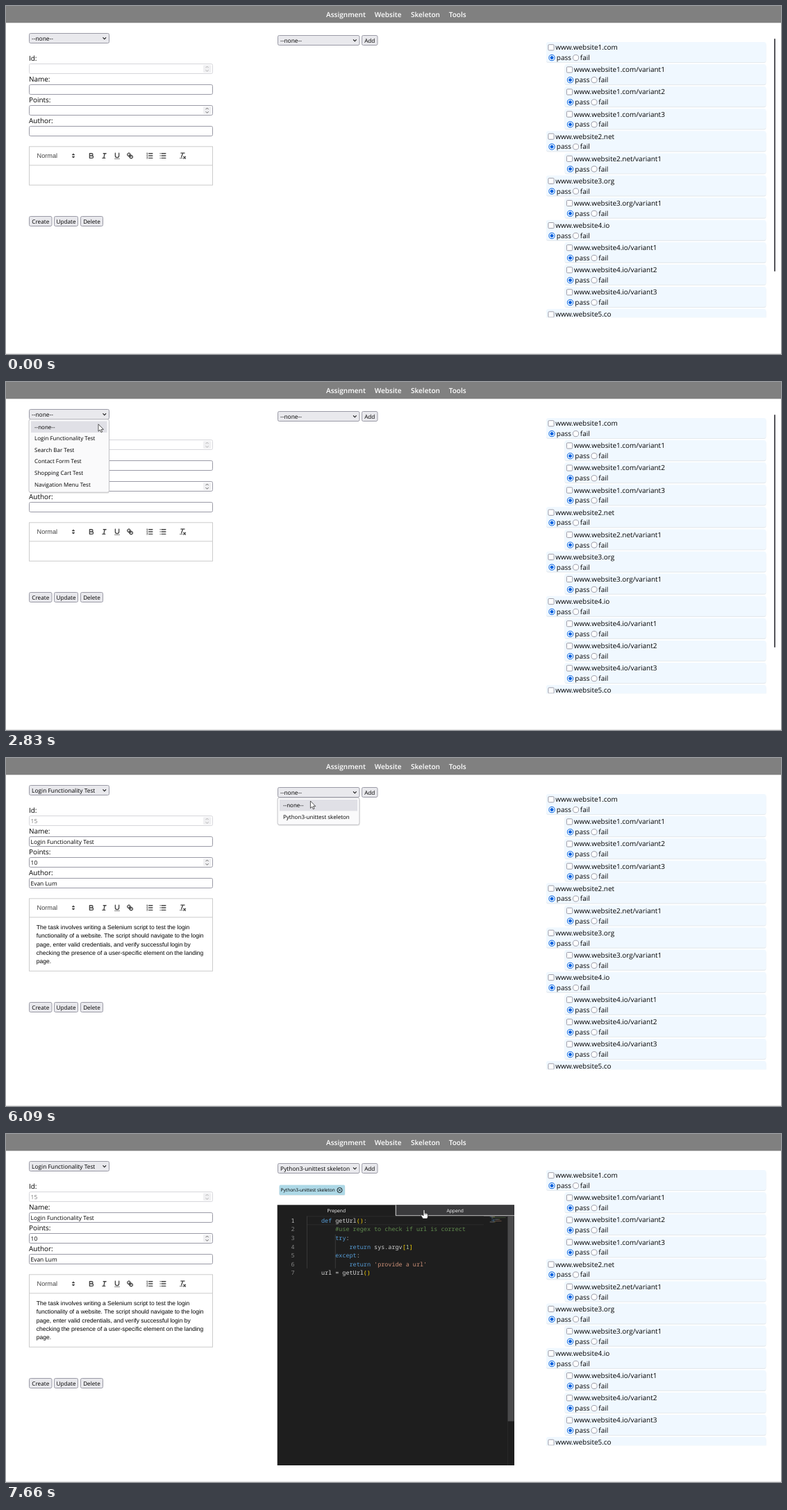
These frames come from a looping animation (1116x502 px, 8000 ms). An HTML page:

```html
<!DOCTYPE html>
<html lang="en">
<head>
<meta charset="utf-8">
<title>Assignment editor</title>
<style>
html, body { margin: 0; width: 100%; height: 100%; overflow: hidden; background: #fff; }
svg { display: block; width: 1116px; height: 502px; }
text { font-family: "Open Sans", "Noto Sans", sans-serif; white-space: pre; text-rendering: geometricPrecision; }
.arial { font-family: "Liberation Sans", Arial, sans-serif; }
.mono { font-family: "Noto Sans Mono", "DejaVu Sans Mono", monospace; }
.ico { fill: none; stroke: #444; stroke-width: 2; stroke-linecap: round; stroke-linejoin: round; }
.ico .fill { fill: #444; stroke: none; }
</style>
</head>
<body>
<svg id="stage" viewBox="0 0 1116 502" xmlns="http://www.w3.org/2000/svg"></svg>
<script>
const LOOP = 8000;
const BORDER = '#9a9aa6', BORDER_HOVER = '#676774', FACE = '#e9e9ed', FACE_HOVER = '#d0d0d7';

// Drawing helpers, all returning SVG markup
const text = (x, y, s, size, more = '') => `<text x="${x}" y="${y}" font-size="${size}" ${more}>${s}</text>`;
const rect = (x, y, w, h, fill, more = '') => `<rect x="${x}" y="${y}" width="${w}" height="${h}" fill="${fill}" ${more}/>`;
const group = (id, body, more = '') => `<g id="${id}" ${more}>${body}</g>`;
const box = (x, y, w, h, fill, more = '') => rect(x, y, w, h, fill, `rx="2" stroke="${BORDER}" ${more}`);
const mid = 'text-anchor="middle"';

const button = (x, y, w, label) => box(x, y, w, 14, FACE) + text(x + w / 2, y + 10.3, label, 8.2, mid);

const select = (id, x, y, w) => box(x, y, w, 14, FACE, `id="${id}"`) +
  text(x + 3.6, y + 10.2, '--none--', 8.4, `id="${id}Text"`) +
  `<path d="M${x + w - 9} ${y + 5.9}l2.3 2.4 2.3-2.4" fill="none" stroke="#111" stroke-width="1.1"/>`;

const popup = (id, x, y, w, items) => {
  const h = items.length * 16.6 + 5.8;
  return group(id,
    rect(x + .5, y + 1.5, w, h, 'rgba(0,0,0,.1)', 'rx="2.5"') +
    rect(x, y, w, h, '#fafafb', 'rx="2.5" stroke="#c2c2c6"') +
    rect(x + 3, y + 2.7, w - 6, 16.4, '#e0e0e6', `id="${id}Mark"`) +
    items.map((s, i) => text(x + 8, y + 13.8 + i * 16.6, s, 8.03)).join(''));
};

const spinner = (y, tone) => rect(284, y + 1.8, 11.5, 10.6, '#f0f0f2', 'rx="1"') +
  `<path d="M287.6 ${y + 5.6}l2-2 2 2M287.6 ${y + 8.8}l2 2 2-2" fill="none" stroke="${tone}" stroke-width=".9"/>`;

const icon = (x, body) => `<g class="ico" transform="translate(${x - 5.9} 210.1) scale(.656)">${body}</g>`;

const fieldY = i => 83.5 + i * 30;

function navBar() {
  const items = [['Assignment', 461], ['Website', 530.7], ['Skeleton', 583], ['Tools', 637.7]];
  return rect(0, 0, 1116, 24.3, '#808080') +
    items.map(([s, x]) => text(x, 16, s, 10.05, 'fill="#fff" font-weight="600"')).join('');
}

function form() {
  const labels = ['Id:', 'Name:', 'Points:', 'Author:'];
  const values = ['15', 'Login Functionality Test', '10', 'Evan Lum'];
  let out = select('pick', 33.5, 39.5, 115), filled = '';
  labels.forEach((s, i) => {
    const y = fieldY(i);
    out += text(33, y - 4.1, s, 9.95) +
      rect(33.5, y, 264, 14, '#fff', `id="in${i}" rx="2" stroke="${i ? BORDER : '#d6d6db'}"`);
    if (i % 2 === 0) out += spinner(y, i ? '#555' : '#aaa');
    filled += text(35.6, y + 10.3, values[i], 8.4, i ? '' : 'fill="#777"');
  });
  return out + group('values', filled);
}

function editor() {
  const lines = [
    'The task involves writing a Selenium script to test the login',
    'functionality of a website. The script should navigate to the login',
    'page, enter valid credentials, and verify successful login by',
    'checking the presence of a user-specific element on the landing',
    'page.'
  ];
  const bars = x => `<path d="M${x} 4H15M${x} 9H15M${x} 14H15"/>`;
  const tools =
    icon(97, '<path fill="#444" d="M7 11l2 2 2-2zM7 7l2-2 2 2z"/>') +
    icon(123, '<path d="M5 4H9.5a2.5 2.5 0 0 1 0 5H5zM5 9h5.5a2.5 2.5 0 0 1 0 5H5z"/>') +
    icon(141.5, '<path d="M7 4h6M5 14h6M8 14L10 4"/>') +
    icon(160, '<path d="M5 3V9a4 4 0 0 0 8 0V3"/><rect class="fill" x="3" y="15" width="12" height="1"/>') +
    icon(178.6, '<path d="M7 7l4 4M8.9 4.6a3.5 3.5 0 0 1 .36 4.7A3.5 3.5 0 0 1 4.6 8.9C3.2 7.5 2 6.4 4.2 4.2S7.5 3.2 8.9 4.6zM13.4 9.1a3.5 3.5 0 0 0-4.7-.36 3.5 3.5 0 0 0 .36 4.7c1.4 1.4 2.5 2.5 4.7.36S14.8 10.5 13.4 9.1z"/>') +
    icon(207, bars(7) + '<path stroke-width="1" d="M2.5 2.9l1-.5V5.5M2.5 5.5h2M2.5 8h1.8L2.5 10.5h2M2.5 12.5h2l-1 1.3q1.2.2.8 1.2-.6.8-1.8.3"/>') +
    icon(226, bars(6) + '<path d="M3 4h.01M3 9h.01M3 14h.01"/>') +
    icon(254.5, '<path d="M5 3h8M6 12L9.35 3M11 11l4 4M15 11l-4 4"/><rect class="fill" x="2" y="14" width="7" height="1"/>');
  return rect(33.5, 202.8, 264, 55.5, '#fff', 'id="frame" stroke="#ccc"') +
    '<path d="M33.5 229.8H297.5" stroke="#ccc"/>' +
    text(44.6, 219.3, 'Normal', 9.19, 'class="arial" fill="#444"') + tools +
    group('task', lines.map((s, i) => text(43.8, 247 + i * 12.25, s, 8.53, 'class="arial"')).join('')) +
    group('buttons', button(33.5, 303.5, 32.5, 'Create') + button(69.5, 303.5, 34, 'Update') + button(107.5, 303.5, 32, 'Delete'));
}

function siteList() {
  const sites = [['www.website1.com', 3], ['www.website2.net', 1], ['www.website3.org', 1], ['www.website4.io', 3], ['www.website5.co', 0]];
  const names = sites.flatMap(([s, n]) => [s, ...Array.from({ length: n }, (_, k) => `${s}/variant${k + 1}`)]);
  const ring = (x, y, r, fill, stroke) => `<circle cx="${x}" cy="${y}" r="${r}" fill="${fill}" stroke="${stroke}"/>`;
  const rows = names.map((s, i) => {
    const dx = s.includes('/') ? 26.5 : 0, y = 59.7 + i * 32.1;
    return rect(778 + dx, y - 6.6, 316.5 - dx, 29, '#e5eaee', 'rx="3"') +
      rect(778 + dx, y - 7.8, 316.5 - dx, 29, '#f0f8ff', 'rx="3"') +
      rect(780.9 + dx, y - 4, 8.2, 8.2, '#fff', `rx="1.3" stroke="${BORDER}"`) +
      text(791.3 + dx, y + 3.5, s, 9.95) +
      ring(786 + dx, y + 14.9, 4.1, '#fff', '#0060df') + ring(786 + dx, y + 14.9, 2, '#0060df', '#0060df') +
      text(792.8 + dx, y + 18.3, 'pass', 9.95) +
      ring(820.5 + dx, y + 14.9, 4.1, '#fff', BORDER) + text(826.8 + dx, y + 18.3, 'fail', 9.95);
  }).join('');
  return `<clipPath id="clip"><rect x="770" y="45" width="330" height="404.2"/></clipPath>` +
    `<g clip-path="url(#clip)">${rows}</g>` + rect(1106, 47, 2, 336, '#55555a', 'id="bar" rx="1"');
}

function chip() {
  return group('chip', rect(393.4, 74.4, 95, 14.4, 'rgba(0,0,0,.1)', 'rx="2"') +
    rect(393.6, 73.6, 94.4, 14.4, '#add8e6', 'rx="1.5"') +
    text(395.6, 83.3, 'Python3-unittest skeleton', 6.56) +
    '<circle cx="480.5" cy="81" r="3.6" fill="none" stroke="#111" stroke-width=".9"/>' +
    '<path d="M479 79.5l3 3m0-3l-3 3" stroke="#111" stroke-width=".9"/>');
}

function codePane() {
  const blue = '#569cd6', plain = '#d4d4d4', gold = '#ffd700', green = '#608b4e', red = '#ce9178', num = '#b5cea8';
  const code = [
    [4, ['def', blue], [' getUrl', plain], ['()', gold], [':', plain]],
    [8, ['#use regex to check if url is correct', green]],
    [8, ['try', blue], [':', plain]],
    [12, ['return', blue], [' sys.argv', plain], ['[', gold], ['1', num], [']', gold]],
    [8, ['except', blue], [':', plain]],
    [12, ['return', blue], [" 'provide a url'", red]],
    [4, ['url = getUrl', plain], ['()', gold]]
  ];
  const X = 433.6, CH = 5.08, LH = 12.55;
  const row = (parts, i) => {
    const [col, ...runs] = parts, y = 127.9 + i * LH;
    return text(413, y, i + 1, 8.46, `class="mono" ${mid} fill="${i ? '#858585' : '#c6c6c6'}"`) +
      text(X + col * CH, y, runs.map(([s, c]) => `<tspan fill="${c}">${s}</tspan>`).join(''), 8.46, 'class="mono"');
  };
  const mini = code.map(([col, ...runs], i) => {
    let x = 694.5 + col * .56;
    return runs.map(([s, c]) => {
      const w = s.length * .56, r = rect(x, 119 + i * 1.25, w, .8, c, 'opacity=".5"');
      x += w;
      return r;
    }).join('');
  }).join('');
  const guides = `<path d="M433.5 118.5V${118.5 + LH * 6}M474.3 ${118.5 + LH * 2.1}V${118.5 + LH * 6}" stroke="#404040" stroke-width=".8"/>`;
  const lineBox = '<path d="M433.5 118.9H688M433.5 130.8H688" stroke="#2b2b2b"/>';
  return group('pane',
    rect(390.7, 102.3, 341.3, 375.7, '#1e1e1e') +
    rect(561.2, 102.6, 170.6, 15.2, '#3b3b3d') + '<path d="M561.3 102.3V117.8H732" fill="none" stroke="#d8d8d8"/>' +
    text(475.8, 112.9, 'Prepend', 6.7, mid + ' fill="#fff"') + text(646.7, 112.9, 'Append', 6.7, mid + ' fill="#fff"') +
    lineBox + '<path d="M722.4 118.5V478" stroke="#303030" stroke-width=".7"/>' +
    rect(722.6, 118.4, 9, 13, '#4a4a4b', 'id="slider"') +
    group('early', row([4, ['def getUrl', plain], ['()', gold], [':', plain]], 0) +
      '<path d="M687.3 118.5V478" stroke="#121212" stroke-width="1.4"/><path d="M433.5 118.5v12.5" stroke="#404040" stroke-width=".8"/>') +
    group('late', guides + code.map(row).join('') + mini));
}

const pointers = group('arrow', '<path d="M0 0V10.4L2.4 8.2 4 11.8 5.7 11 4.1 7.6H7.4Z" fill="#fff" stroke="#222" stroke-width=".75" stroke-linejoin="round"/>') +
  group('hand', '<path d="M-1 1a1 1 0 0 1 2 0V4.5q1.1-.4 1.6.4 1.1-.3 1.5.5 1.3-.1 1.4 1V9.2q0 1.6-1 3.6H-1.8C-2.4 11-4 9.6-4.5 7.9q.2-1.3 1.6-.7L-1 8.6Z" fill="#fff" stroke="#222" stroke-width=".8" stroke-linejoin="round"/><path d="M1 4.5V6.8M2.6 4.9V7M4.1 5.4V7.2" stroke="#222" stroke-width=".6"/>');

document.getElementById('stage').innerHTML =
  rect(0, 0, 1116, 502, '#fff') + rect(0, 501, 1116, 1, '#e2e2e2') + navBar() + form() + editor() +
  select('skel', 391.5, 42.5, 117.5) + button(512.5, 42.5, 22.5, 'Add') + chip() + codePane() + siteList() +
  popup('menu1', 33, 53.8, 115.5, ['--none--', 'Login Functionality Test', 'Search Bar Test', 'Contact Form Test', 'Shopping Cart Test', 'Navigation Menu Test']) +
  popup('menu2', 391, 57.3, 118, ['--none--', 'Python3-unittest skeleton']) + pointers;

const el = {};
document.querySelectorAll('[id]').forEach(n => el[n.id] = n);
const show = (id, on) => el[id].setAttribute('display', on ? 'inline' : 'none');
const set = (id, name, v) => el[id].setAttribute(name, v);

// Pointer moves: first step, last step, step count, way points
const moves = [
  [650, 1410, 12, [961, 495], [540, 310], [215, 165], [150, 119]],
  [1480, 1960, 8, [150, 119], [138, 80], [133, 52]],
  [2760, 3040, 5, [133, 52], [133, 77]],
  [3920, 4680, 12, [133, 77], [235, 82], [350, 78], [434, 62]],
  [4750, 4880, 2, [434, 62], [438, 55]],
  [5080, 5080, 1, [438, 55], [437.6, 54.4]],
  [5350, 5350, 1, [437.6, 54.4], [438, 54.6]],
  [5960, 6090, 3, [438, 54.6], [438.4, 62]],
  [6160, 6490, 6, [438.4, 62], [438.8, 87.6]],
  [6950, 7660, 11, [438.8, 87.6], [470, 111], [535, 117], [602, 109.3]]
];

function pointerAt(t) {
  const m = moves.filter(v => t >= v[0]).pop();
  if (!m) return null;
  const [a, b, n, ...pts] = m;
  const k = n > 1 ? Math.min(n - 1, Math.floor((t - a) / (b - a) * (n - 1) + .01)) : 0;
  const p = a === 650 ? k / (n - 1) : (k + 1) / n;
  const u = p * p * (3 - 2 * p) * (pts.length - 1), i = Math.min(pts.length - 2, Math.floor(u)), f = u - i;
  return [0, 1].map(c => pts[i][c] + (pts[i + 1][c] - pts[i][c]) * f);
}

function draw(t) {
  const pos = pointerAt(t), [px, py] = pos || [-99, -99];
  const over = (x0, y0, x1, y1) => px >= x0 && px <= x1 && py >= y0 && py <= y1;
  const open1 = t >= 2170 && t < 3370, open2 = t >= 5750 && t < 6560;
  const filled = t >= 3440, pane = t >= 6630, late = t >= 6700;

  const hot1 = !open1 && over(33, 39, 149, 54), hot2 = !open2 && over(391, 42, 509, 57);
  [['pick', hot1], ['skel', hot2]].forEach(([id, hot]) => {
    set(id, 'fill', hot ? FACE_HOVER : FACE);
    set(id, 'stroke', hot ? BORDER_HOVER : BORDER);
  });
  for (let i = 1; i < 4; i++) {
    const y = fieldY(i);
    set('in' + i, 'stroke', !open1 && over(33, y, 298, y + 14) ? BORDER_HOVER : BORDER);
  }
  el.pickText.textContent = t >= 3370 ? 'Login Functionality Test' : '--none--';
  el.skelText.textContent = t >= 6560 ? 'Python3-unittest skeleton' : '--none--';

  show('menu1', open1);
  show('menu2', open2);
  set('menu1', 'opacity', t < 2240 ? .6 : 1);
  set('menu2', 'opacity', t < 5820 ? .6 : 1);
  set('menu1Mark', 'y', py > 73 ? 73.1 : 56.5);
  set('menu2Mark', 'y', py > 76.5 ? 76.6 : 60);

  show('values', filled);
  show('task', filled);
  show('chip', filled);
  set('frame', 'height', filled ? 104.5 : 55.5);
  set('buttons', 'transform', `translate(0 ${filled ? 49 : 0})`);
  set('bar', 'opacity', 1 - Math.min(1, Math.max(0, (t - 3370) / 350)));

  show('pane', pane);
  show('early', !late);
  show('late', late);
  set('slider', 'height', late ? 296 : 13);

  const hand = !open2 && filled && (over(393, 73, 489, 89) || (pane && t >= 6950));
  show('arrow', pos && !hand);
  show('hand', pos && hand);
  ['arrow', 'hand'].forEach(id => set(id, 'transform', `translate(${px} ${py})`));
}

function tick() {
  draw(performance.now() % LOOP);
  requestAnimationFrame(tick);
}
tick();
</script>
</body>
</html>
```
